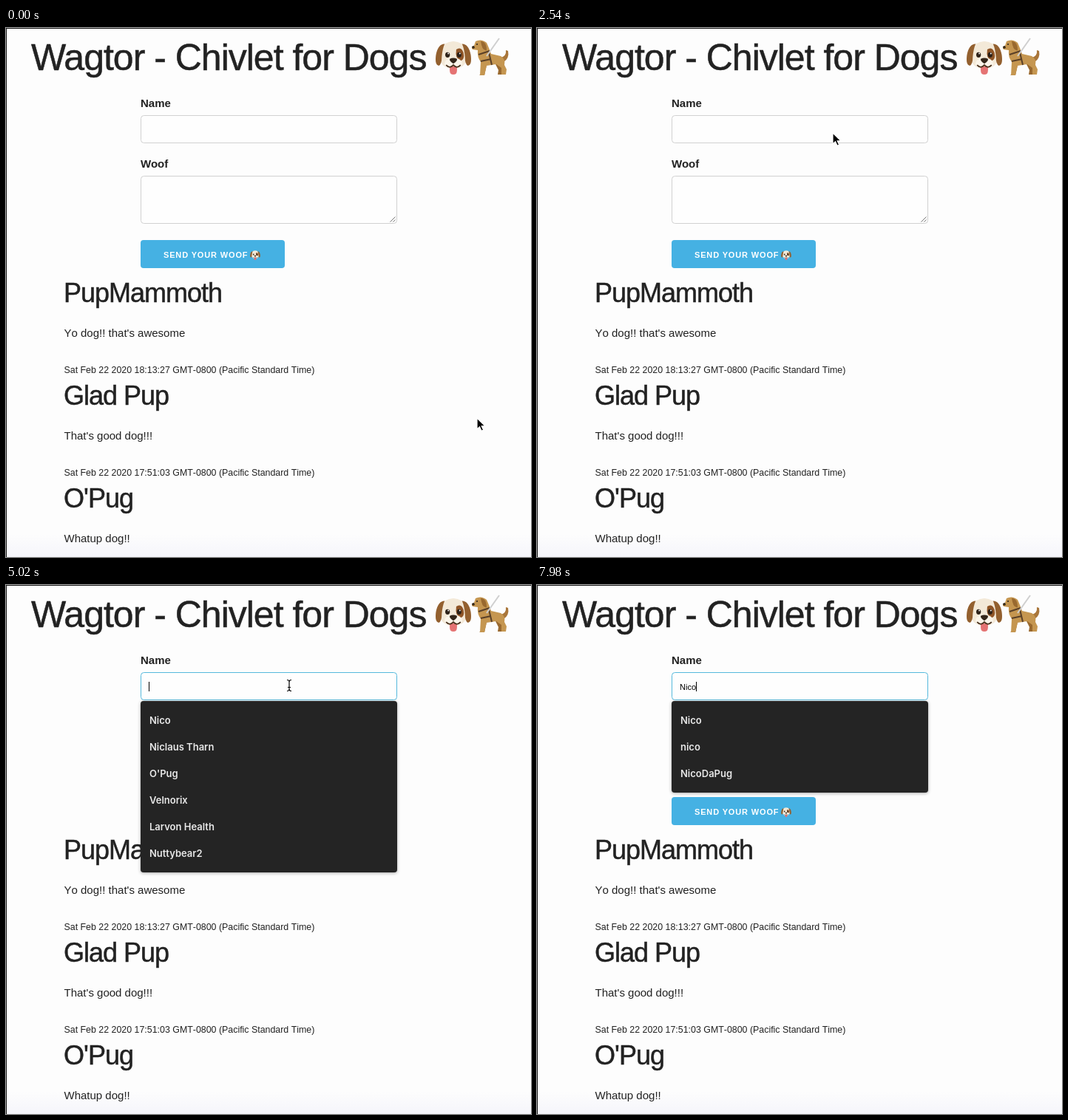
Write an HTML page that moves like this. It is 710 by 716 pixels and loops after 8 s.

```html
<!DOCTYPE html>
<html lang="en">
<head>
<meta charset="utf-8">
<title>Wagtor</title>
<style>
  html, body { margin: 0; width: 100%; height: 100%; overflow: hidden; background: #fdfdfd; }
  svg { display: block; }
  text { font-family: "Liberation Sans", Arial, sans-serif; fill: #222; white-space: pre; }
  .title, .author { letter-spacing: -1px; stroke: #222; stroke-width: .5px; }
  .title { font-size: 50px; }
  .author { font-size: 36px; }
  .body { font-size: 15px; font-kerning: none; }
  .label { font-size: 15px; font-weight: 700; }
  .date { font-size: 12.4px; font-kerning: none; }
  .button { font-size: 11px; font-weight: 700; letter-spacing: .85px; fill: #fff; }
  .typed { font-size: 11px; fill: #000; }
  .option { font: 600 13px Inter, sans-serif; fill: #e8e8e8; }
  .field { fill: #fefefe; stroke: #d1d1d1; }
  .field.focused { stroke: #55b9dc; }
  #menu rect { filter: drop-shadow(0 1px 2px #0005); }
</style>
</head>
<body>
<svg id="stage" width="710" height="716" viewBox="0 0 710 716">
  <defs>
    <linearGradient id="fade" x1="0" y1="0" x2="0" y2="1">
      <stop offset="0" stop-color="#fdfdfd"/>
      <stop offset="1" stop-color="#f5f5fb"/>
    </linearGradient>
    <g id="face">
      <path d="M13 5Q25-3 37 5Q44 14 43 31Q37 42 25 42Q13 42 7 31Q5 14 13 5Z" fill="#f3e9d8"/>
      <path d="M29 13Q36 8 39 18Q41 28 35 30Q27 27 29 13Z" fill="#8f5527"/>
      <path d="M13 5Q4 5 1 21Q-1 36 5 37Q9 35 9 24Q10 12 13 5ZM37 5Q46 5 49 21Q51 36 45 37Q41 35 41 24Q40 12 37 5Z" fill="#93602f"/>
      <ellipse cx="25" cy="34" rx="12" ry="9" fill="#fbf5ea"/>
      <path d="M20 38H30V44Q30 50 25 50Q20 50 20 44Z" fill="#e57373"/>
      <path d="M15 36Q20 42 25 36Q30 42 35 36" fill="none" stroke="#49301c" stroke-width="1.8"/>
      <path d="M20 27Q25 24 30 27Q31 30 25 34Q19 30 20 27Z" fill="#33261a"/>
      <ellipse cx="17" cy="21" rx="3.2" ry="4" fill="#2c2118"/>
      <ellipse cx="33" cy="21" rx="3.2" ry="4" fill="#2c2118"/>
      <circle cx="18" cy="19" r="1" fill="#fff"/>
      <circle cx="34" cy="19" r="1" fill="#fff"/>
    </g>
  </defs>

  <rect width="710" height="716" fill="#fdfdfd"/>
  <rect y="686" width="710" height="30" fill="url(#fade)"/>
  <path d="M0 .5H710M.5 0V716" stroke="#1c1c1c"/>

  <text class="title" x="34" y="57">Wagtor - Chivlet for Dogs</text>
  <use href="#face" transform="translate(580.5 17) scale(.98 .92)"/>
  <g id="guide">
    <path d="M669 40Q677 38 676 30L679 31Q681 41 673 46Z" fill="#a9763a"/>
    <path d="M644 48V61L640 64H647L650 50ZM662 49L666 57L665 63H671L670 48Z" fill="#99692f"/>
    <path d="M635 18Q643 14 650 20Q654 29 656 35L669 38Q676 42 674 50L677 56L676 63H670L670 54L663 49L650 51L647 64H641L642 46Q637 39 638 30L631 29Q628 26 633 24Z" fill="#c59650"/>
    <path d="M642 18Q650 18 650 30Q644 32 642 18Z" fill="#99692f"/>
    <path d="M630 25L633 24L634 27L631 28Z" fill="#30261a"/>
    <circle cx="637" cy="22" r="1.1" fill="#30261a"/>
    <path d="M639 36L654 31M653 33L657 50M642 45L656 42" fill="none" stroke="#5a4028" stroke-width="2"/>
    <path d="M650 38L667 14" stroke="#cfcfcf" stroke-width="2"/>
  </g>

  <text class="label" x="182" y="107">Name</text>
  <rect class="field" id="nameField" x="182.5" y="118.5" width="346" height="37" rx="4"/>
  <text class="label" x="182" y="189">Woof</text>
  <rect class="field" x="182.5" y="200.5" width="346" height="64" rx="4"/>
  <path d="M519.5 262.5L526.5 255.5M523.5 262.5L526.5 259.5" stroke="#777"/>

  <rect x="182" y="287" width="195" height="38" rx="4" fill="#45b1e3"/>
  <text class="button" x="213" y="311">SEND YOUR WOOF</text>
  <use href="#face" transform="translate(330 301) scale(.28 .26)"/>

  <g id="posts"></g>
  <text class="typed" id="typed" x="193" y="142"></text>
  <path id="caret" d="M0 131V144" stroke="#000"/>
  <g id="menu"></g>

  <path id="arrow" d="M0 0V15L3.5 11.8L6 17.3L8.6 16.1L6.2 10.8H11Z" fill="#000" stroke="#fff" stroke-width="1.2"/>
  <path id="beam" d="M-3 -7.5Q0 -7.5 0 -5Q0 -7.5 3 -7.5M0 -5.5V6M-3 7.5Q0 7.5 0 5Q0 7.5 3 7.5M-2 2.5H2" fill="none" stroke="#000" stroke-width="1.2"/>
</svg>
<script>
const LOOP = 8000, BEAM_AT = 2900, FOCUS_AT = 3700, TYPING_AT = 6000;
const $ = id => document.getElementById(id);
const svgText = (cls, x, y, text) => `<text class="${cls}" x="${x}" y="${y}">${text}</text>`;
const show = (el, on) => el.setAttribute("visibility", on ? "visible" : "hidden");

const posts = [
  ["PupMammoth", "Yo dog!! that's awesome", "18:13:27"],
  ["Glad Pup", "That's good dog!!!", "17:51:03"],
  ["O'Pug", "Whatup dog!!", ""]
];
$("posts").innerHTML = posts.map(([author, body, time], i) => {
  const y = 371 + i * 139;
  return svgText("author", 78, y, author) + svgText("body", 78.5, y + 47, body) +
    (time && svgText("date", 78.5, y + 96, `Sat Feb 22 2020 ${time} GMT-0800 (Pacific Standard Time)`));
}).join("");

const exact = ["Nico", "nico", "NicoDaPug"];
const steps = [
  { at: 0, typed: "", options: [] },
  { at: 4600, typed: "", options: ["Nico", "Niclaus Tharn", "O'Pug", "Velnorix", "Larvon Health", "Nuttybear2"] },
  { at: TYPING_AT, typed: "N", options: ["Nico", "Niclaus Tharn", "Nuttybear2", "nico", "NicoDaPug"] },
  { at: 6250, typed: "Ni", options: ["Nico", "Niclaus Tharn", "nico", "NicoDaPug"] },
  { at: 7250, typed: "Nic", options: exact },
  { at: 7550, typed: "Nico", options: exact }
];

// Pointer path: time, x, y
const path = [[0, 637, 528], [700, 411, 202], [1100, 411, 202], [2500, 400, 142], [2560, 400, 142], [3000, 383, 136]];
const ease = p => p * p * (3 - 2 * p);

function pointer(t) {
  const i = path.findIndex(p => p[0] > t);
  if (i < 0) return path[path.length - 1].slice(1);
  const [t0, x0, y0] = path[i - 1], [t1, x1, y1] = path[i];
  const p = ease((t - t0) / (t1 - t0));
  return [x0 + (x1 - x0) * p, y0 + (y1 - y0) * p];
}

let current;
function applyStep(step) {
  if (step === current) return;
  current = step;
  $("typed").textContent = step.typed;
  const width = step.typed ? $("typed").getComputedTextLength() : 0;
  $("caret").setAttribute("transform", `translate(${Math.round(193 + width) + .5} 0)`);
  const rows = step.options;
  $("menu").innerHTML = rows.length
    ? `<rect x="182" y="157" width="347" height="${rows.length * 36 + 16}" rx="4" fill="#242424"/>` +
      rows.map((name, i) => svgText("option", 194, 188 + i * 36, name)).join("")
    : "";
}

function render(t) {
  const step = steps.filter(s => s.at <= t).pop();
  applyStep(step);
  const focused = t >= FOCUS_AT;
  const blinkStart = step.typed ? step.at : FOCUS_AT;
  $("nameField").classList.toggle("focused", focused);
  show($("caret"), focused && (t - blinkStart) % 1000 < 500);
  const [x, y] = pointer(t);
  for (const id of ["arrow", "beam"]) $(id).setAttribute("transform", `translate(${x} ${y})`);
  show($("arrow"), t < BEAM_AT);
  show($("beam"), t >= BEAM_AT && t < TYPING_AT);
}

const start = performance.now();
function tick() {
  render((performance.now() - start) % LOOP);
  requestAnimationFrame(tick);
}
tick();
</script>
</body>
</html>
```
